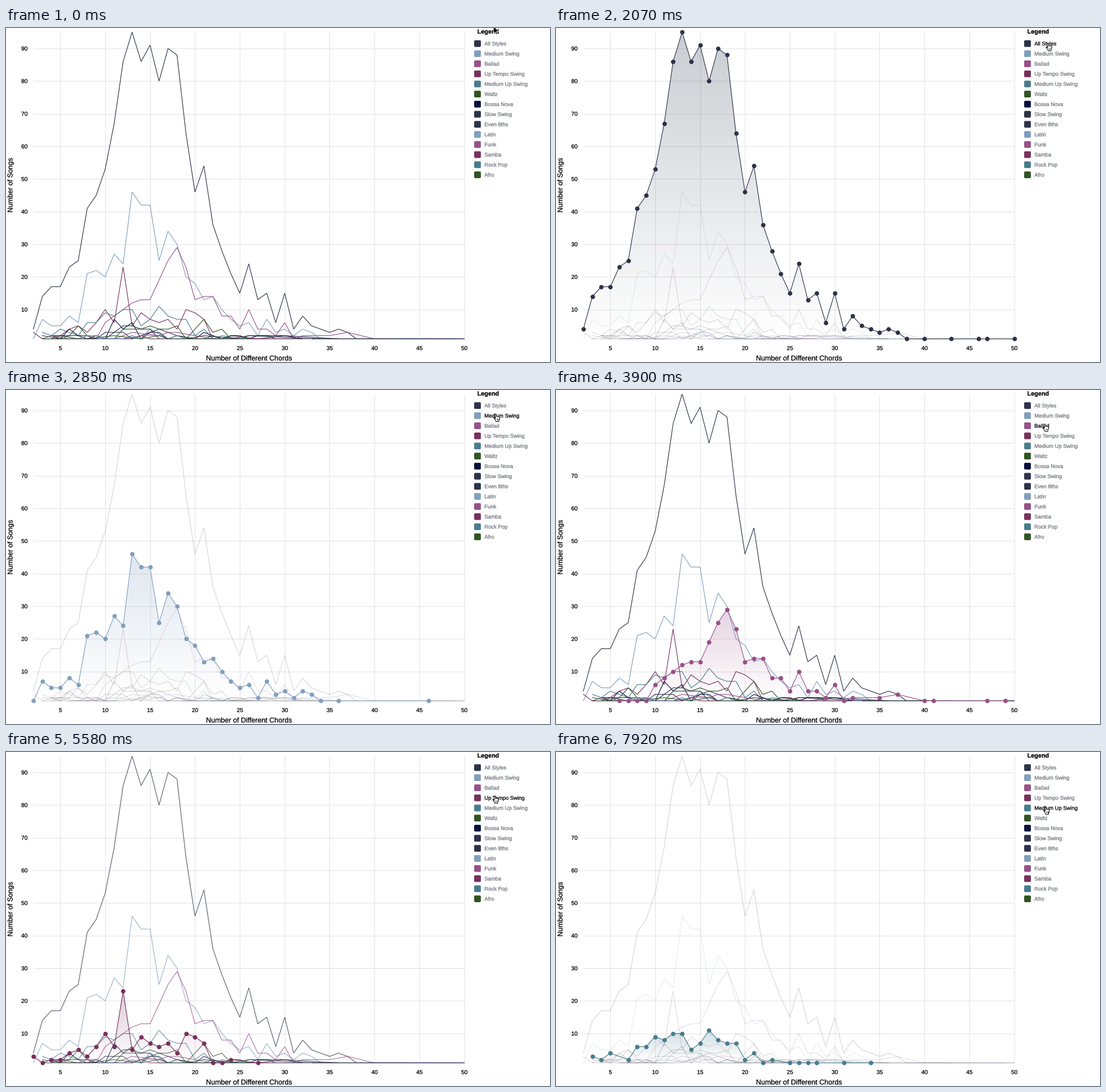
A matplotlib script that plays this animation: 954 px wide and 587 px high, repeating every 8 s.

```python
import numpy as np
import matplotlib.pyplot as plt
from matplotlib.animation import FuncAnimation
from matplotlib.collections import LineCollection
from matplotlib.patches import FancyBboxPatch, PathPatch, Polygon
from matplotlib.textpath import TextPath
from matplotlib.transforms import Affine2D

W, H, DPI = 954, 587, 64
LOOP, STEP = 8000, 40
PT = 72 / DPI  # points per pixel

plt.rcParams["font.family"] = "Liberation Sans"

SLATE, SKY, ORCHID, PLUM = "#2c3349", "#819fbe", "#985089", "#78305d"
TEAL, GREEN, NAVY, GREY = "#487c8e", "#2f5524", "#07103f", "#757981"
LEFT, RIGHT, TOP, BASE = 48, 803.6, 7.3, 546.4
MAX_X = 50
FADED = 0.2


def px(x):
    return LEFT + (np.asarray(x) - 2) * (RIGHT - LEFT) / (MAX_X - 2)


def py(y):
    return BASE - (np.asarray(y) - 1) * (BASE - TOP) / 94


def ease(p):
    p = np.clip(p, 0, 1)
    return p * p * (3 - 2 * p)


fig = plt.figure(figsize=(W / DPI, H / DPI), dpi=DPI, facecolor="white")
ax = fig.add_axes([0, 0, 1, 1])
ax.axis("off")


def label(x, y, text, size, color="black", align=0, angle=0, weight="normal"):
    """Outlined text, capitals centred on y; align is 0, 0.5 or 1."""
    path = TextPath((0, 0), text, size=size, prop={"weight": weight})
    place = (Affine2D().translate(-align * path.get_extents().x1, -0.35 * size)
             .scale(1, -1).rotate_deg(angle).translate(x, y))
    return ax.add_patch(PathPatch(path.transformed(place), color=color,
                                  lw=0.3 * PT, zorder=3))


# Grid and axes
grid = [[(px(x), TOP), (px(x), BASE)] for x in range(5, MAX_X + 1, 5)]
grid += [[(LEFT, py(y)), (RIGHT, py(y))] for y in range(10, 91, 10)]
ax.add_collection(LineCollection(grid, colors="#e2e2e2", linewidths=PT, zorder=1))
for x in range(5, MAX_X + 1, 5):
    label(px(x), 562.5, str(x), 10, align=0.5)
for y in range(10, 91, 10):
    label(37.5, py(y), str(y), 10, align=1)
label(426, 580, "Number of Different Chords", 12.35, align=0.5)
label(7, 276.5, "Number of Songs", 12.35, align=0.5, angle=-90)
label(826.5, 6, "Legend", 10.7, weight="bold")

styles = []


def counts(start, values, ones=()):
    """Song counts by number of chords, with a sparse tail of single songs."""
    c = np.zeros(MAX_X + 1, dtype=int)
    c[start:start + len(values)] = values
    c[list(ones)] = 1
    return c


def add_style(name, color, c):
    """Add one line and its legend entry; a zero count is a gap."""
    n = len(styles)
    xs, ys = px(np.flatnonzero(c)), py(c[c > 0])
    line, = ax.plot(xs, ys, color=color, lw=1.15 * PT, zorder=3,
                    solid_joinstyle="miter")
    yc = 27.4 + 17.74 * n
    ax.add_patch(FancyBboxPatch((821, yc - 5.9), 11.8, 11.8, lw=0, fc=color,
                                boxstyle="round,pad=0,rounding_size=2"))
    text = label(839, yc, name, 9.35, GREY)
    styles.append(dict(color=color, xs=xs, ys=ys, line=line, text=text))


total = counts(2, [
    4, 14, 17, 17, 23, 25, 41, 45, 53, 67, 86, 95, 86, 91, 80, 90, 88, 64, 46,
    54, 36, 28, 21, 15, 24, 13, 15, 6, 15, 4, 8, 5, 4, 3, 4, 3],
    (38, 40, 43, 46, 47, 50))
medium = counts(2, [
    1, 7, 5, 5, 8, 6, 21, 22, 20, 27, 24, 46, 42, 42, 25, 34, 30, 20, 18, 13,
    14, 10, 7, 5, 6, 2, 7, 3, 4, 2, 4, 3], (34, 36, 46))
ballad = counts(10, [
    6, 8, 10, 12, 13, 13, 19, 25, 29, 23, 13, 14, 14, 8, 8, 4, 10, 4, 4, 2, 6,
    1, 2, 0, 0, 2, 0, 3], (6, 7, 8, 9, 40, 41, 47, 49))
up_tempo = counts(2, [
    3, 1, 2, 2, 4, 5, 3, 6, 10, 6, 23, 5, 9, 7, 6, 7, 4, 10, 9, 7, 1, 1, 2],
    (27,))
medium_up = counts(3, [
    3, 2, 4, 0, 2, 6, 6, 9, 8, 10, 10, 5, 7, 11, 8, 7, 7, 2, 4, 1, 2],
    (25, 26, 27, 28, 31, 34))

add_style("All Styles", SLATE, total)
add_style("Medium Swing", SKY, medium)
add_style("Ballad", ORCHID, ballad)
add_style("Up Tempo Swing", PLUM, up_tempo)
add_style("Medium Up Swing", TEAL, medium_up)
MAIN = len(styles)

# The small styles share out whatever the main ones leave of the total.
small = [("Waltz", GREEN), ("Bossa Nova", NAVY), ("Slow Swing", SLATE),
         ("Even 8ths", SLATE), ("Latin", SKY), ("Funk", ORCHID),
         ("Samba", PLUM), ("Rock Pop", TEAL), ("Afro", GREEN)]
rng = np.random.default_rng(4)
share = 0.8 ** np.arange(len(small))
left = np.maximum(total - medium - ballad - up_tempo - medium_up, 0)
split = np.array([rng.multinomial(n, share / share.sum()) for n in left])
for (name, color), c in zip(small, split.T):
    add_style(name, color, c)


def add_area(style):
    """Gradient fill below a line, fading towards the base."""
    xs, ys = style["xs"], style["ys"]
    rgba = np.zeros((256, 1, 4), dtype=np.uint8)
    rgba[..., :3] = [int(style["color"][i:i + 2], 16) for i in (1, 3, 5)]
    rgba[:, 0, 3] = np.linspace(0.25, 0, 256) * 255
    img = ax.imshow(rgba, extent=(xs[0], xs[-1], BASE, ys.min()), aspect="auto",
                    interpolation="nearest", zorder=2, visible=False)
    outline = [(xs[0], BASE), *zip(xs, ys), (xs[-1], BASE)]
    img.set_clip_path(Polygon(outline, transform=ax.transData))
    style["area"] = img


for s in styles[:MAIN]:
    add_area(s)

dots, = ax.plot([], [], "o", ms=7.8 * PT, mew=0, zorder=5)

# Mouse pointers
ARROW = np.array([(0, 0), (0, 12.5), (2.9, 9.9), (4.8, 14.3), (6.8, 13.4),
                  (4.9, 9.2), (9, 9)])
HAND = np.array([(2.6, 1), (4.6, 1), (5.2, 5.2), (7.6, 5.2), (10.4, 6),
                 (10.8, 7.2), (9.2, 12), (9, 14), (4, 14), (3.6, 12.2),
                 (0.3, 7.6), (0.8, 6.8), (3.3, 8.6)])
CREASES = np.array([[(x, 8.8), (x, 11.4)] for x in (5.2, 6.9, 8.6)])
arrow = ax.add_patch(Polygon(ARROW, fc="black", ec="white", lw=0.7 * PT, zorder=9))
hand = ax.add_patch(Polygon(HAND, fc="white", ec="black", lw=PT, zorder=9))
creases = LineCollection(CREASES, colors="black", linewidths=0.7 * PT, zorder=10)
ax.add_collection(creases)

ax.set_xlim(0, W)
ax.set_ylim(H, 0)

# For each main style: pointer sets off, style lights up, other lines have faded
VISITS = [(890, 1070, 1440), (2190, 2550, 2850), (3690, 3910, 4200),
          (5100, 5480, 5780), (6770, 7080, 7290)]
LEAVES = [v[0] for v in VISITS] + [LOOP + 100]
TRAVEL = 190       # time to reach the next entry and restore the lines
NUDGE_LEAD = 180   # the pointer twitches this long before it leaves
NUDGE = np.array([0, 2])
STOPS = [np.array([855, -3])]
STOPS += [np.array([853 + 0.9 * (i - 2.6) ** 2, 24.3 + 17.3 * i])
          for i in range(MAIN)]


def state(t):
    """Hovered style (or -1), opacity of the other lines, pointer place."""
    k = sum(leave <= t for leave in LEAVES)
    hovered, opacity, spot = -1, 1, STOPS[k]
    if k:
        leave, enter, settle = VISITS[k - 1]
        move = ease((t - leave) / TRAVEL)
        start = STOPS[k - 1] + NUDGE
        spot = start + (spot - start) * move
        if t >= enter:
            hovered = k - 1
            fade = np.floor(3 * (t - enter) / (settle - enter)) / 3
            opacity = 1 - (1 - FADED) * ease(fade)
        elif k > 1:
            opacity = FADED + (1 - FADED) * move
    if t > LEAVES[k] - NUDGE_LEAD:
        spot = spot + NUDGE
    return hovered, opacity, spot


def draw(frame):
    t = (frame + 1) * STEP
    hovered, opacity, spot = state(t)
    for i, s in enumerate(styles):
        on = i == hovered
        s["line"].set(alpha=1 if on else opacity, zorder=4 if on else 3)
        s["text"].set_color("black" if on else GREY)
        if "area" in s:
            s["area"].set_visible(on)
    dots.set_visible(hovered >= 0)
    if hovered >= 0:
        s = styles[hovered]
        dots.set_data(s["xs"], s["ys"])
        dots.set_color(s["color"])

    pointing = t >= VISITS[0][1]
    arrow.set_visible(not pointing)
    hand.set_visible(pointing)
    creases.set_visible(pointing)
    arrow.set_xy(ARROW + spot)
    hand.set_xy(HAND + spot)
    creases.set_segments(CREASES + spot)
    return []


anim = FuncAnimation(fig, draw, frames=LOOP // STEP, interval=STEP,
                     repeat=True, repeat_delay=0, blit=False)
plt.show()
```
